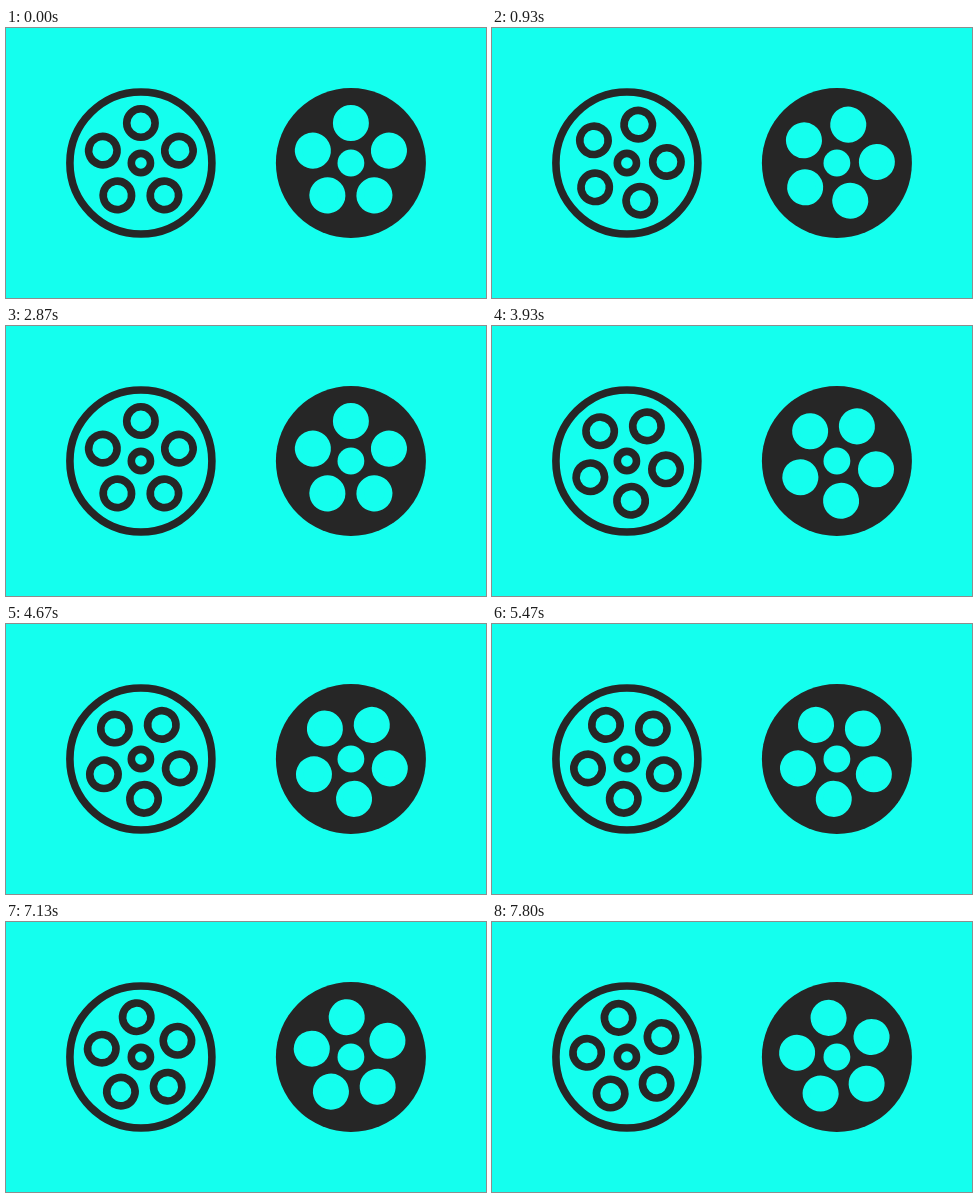
An HTML page for the animation above (7.94 s loop, 480 by 270 pixels).

```html
<!DOCTYPE html>
<html lang="en">
<head>
<meta charset="utf-8">
<title>Film reels</title>
<style>
  html, body { margin: 0; width: 100%; height: 100%; overflow: hidden; background: #14ffee; }
  svg { display: block; width: 480px; height: 270px; }
</style>
</head>
<body>
<svg viewBox="0 0 480 270">
  <defs>
    <g id="holes"></g>
  </defs>
  <g transform="translate(134.9 135)" fill="none" stroke="#262626" stroke-width="7.6">
    <circle r="71"/>
    <circle r="9.6"/>
    <use class="wheel" href="#holes"/>
  </g>
  <g transform="translate(344.9 135)" fill="#14ffee">
    <circle r="75" fill="#262626"/>
    <circle r="13.4"/>
    <use class="wheel" href="#holes" stroke="#14ffee" stroke-width="7.6"/>
  </g>
</svg>
<script>
  const LOOP = 7940, STEP = 1000 / 15, LAST = 117;
  const TURN = 10.8;  // steps for one fifth of a revolution, including a short rest
  const SPEED = 7.5;  // degrees per step

  const holes = document.getElementById('holes');
  for (let i = 0; i < 5; i++) {
    const hole = document.createElementNS('http://www.w3.org/2000/svg', 'circle');
    hole.setAttribute('cy', -40);
    hole.setAttribute('r', 14.2);
    hole.setAttribute('transform', `rotate(${i * 72})`);
    holes.append(hole);
  }

  const wheels = document.querySelectorAll('.wheel');

  function angleAt(ms) {
    const step = Math.min(LAST, Math.floor((ms + 4) / STEP));
    const phase = step % TURN;
    return Math.min(72, SPEED * Math.max(0, phase - 1));
  }

  function draw() {
    const angle = angleAt(performance.now() % LOOP);
    for (const wheel of wheels) wheel.setAttribute('transform', `rotate(${angle})`);
    requestAnimationFrame(draw);
  }
  draw();
</script>
</body>
</html>
```
